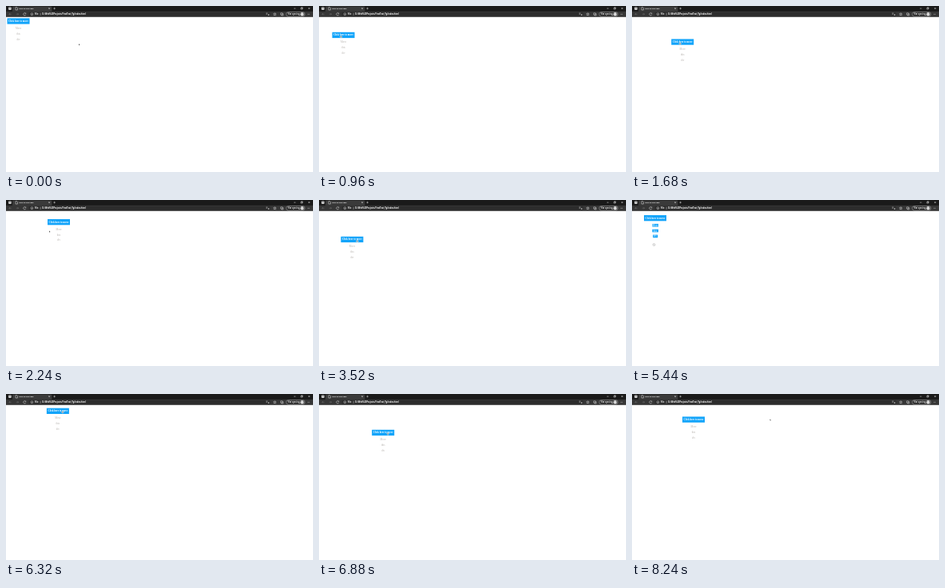
Recreate the animation shown at these times as an HTML page. Size 384 by 208 pixels, loop 8.32 s.

```html
<!DOCTYPE html>
<html lang="en">
<head>
<meta charset="utf-8">
<title>Drag demo</title>
<style>
html, body { margin: 0; width: 100%; height: 100%; overflow: hidden; background: #fff; }
svg { display: block; width: 100vw; height: 100vh; }
.ui { font-family: "Open Sans", sans-serif; font-weight: 700; font-size: 2.5px; fill: #fff; }
.page { font-family: "Liberation Serif", serif; font-size: 3.1px; text-anchor: middle; }
.line { fill: none; stroke: #ddd; stroke-width: .5; }
.dim { stroke: #777; }
</style>
</head>
<body>
<svg viewBox="0 0 384 208">
  <rect width="384" height="208" fill="#fff"/>

  <!-- title bar -->
  <rect width="384" height="7" fill="#1a1a1a"/>
  <path d="M8 7V2Q8 .6 9.4 .6H56Q57.4 .6 57.4 2V7Z" fill="#3a3a3a"/>
  <rect x="3.2" y="1.6" width="3.4" height="3.2" rx=".5" fill="#eee"/>
  <path d="M3.8 2.6H6" stroke="#111" stroke-width=".5"/>
  <path class="line" d="M12 1.6h1.6l.9 .9v2.5H12Z"/>
  <text class="ui" x="16.5" y="4.2" style="font-size:2.2px">Drill-Sh Tou Fash</text>
  <path class="line" d="M53.2 2.2l1.8 1.8m0-1.8l-1.8 1.8M59.3 3.1h2.6m-1.3-1.3v2.6"/>
  <path class="line" d="M360 3.1h2.4M368.8 2.4h1.7v1.7h-1.7ZM369.4 2.4v-.6h1.7v1.7h-.6M378.2 2l2 2m0-2l-2 2"/>

  <!-- toolbar -->
  <rect y="6.8" width="384" height="7" fill="#363636"/>
  <rect x="28.5" y="7.8" width="302" height="5" rx="1.2" fill="#2c2c2c"/>
  <path class="line dim" d="M6.6 10.2H3.8m1.1-1.1l-1.1 1.1l1.1 1.1M12.8 10.2h2.8m-1.1-1.1l1.1 1.1l-1.1 1.1"/>
  <path class="line" d="M24.6 9.3a1.6 1.6 0 1 0 .2 1.5M24.8 8.5v1.1h-1.1"/>
  <circle class="line" cx="32.4" cy="10.2" r="1.4"/>
  <path class="line" d="M32.4 10v.9M43.1 8.7v3"/>
  <text class="ui" x="36" y="11.2">File</text>
  <text class="ui" x="45.3" y="11.2">D:/Web%20Projects/FirstTest_Pg/index.html</text>
  <path class="line" d="M325.3 9h2m-2 1.2h1.6M328.5 10v2m-1-1h2"/>
  <path class="line" d="M336.2 8.6l.5 1.1l1.2 .1l-.9 .8l.3 1.2l-1.1-.6l-1.1 .6l.3-1.2l-.9-.8l1.2-.1Z"/>
  <path class="line" d="M343.6 8.8h2.2v2.2h-2.2ZM344.6 11v.9h2.2V9.7h-1"/>
  <rect x="350.5" y="7.6" width="23.3" height="5.3" rx="2.6" fill="#1b1b1b" stroke="#ccc" stroke-width=".5"/>
  <text class="ui" x="352.6" y="11.1">Not syncing</text>
  <circle cx="370.4" cy="10.3" r="2.2" fill="#d5d5d5"/>
  <path d="M377 10.3h.6m.6 0h.6m.6 0h.6" stroke="#ddd" stroke-width=".6"/>

  <g id="box">
    <rect width="28" height="7.3" fill="#12a4fa"/>
    <text class="page" x="14" y="4.7" fill="#fff" font-weight="bold">Click here to move</text>
    <g id="marks" fill="#12a4fa"></g>
    <g id="lines" class="page"></g>
  </g>

  <g id="cursor">
    <path id="arrow" d="M0 0V1.9L.5 1.5L.9 2.2L1.2 2L.8 1.3H1.5Z" fill="#444"/>
    <g id="cross" fill="none">
      <path d="M-1.6 0H1.6M0-1.6V1.6" stroke="#fff" stroke-width="1.1"/>
      <path d="M-1.5 0H1.5M0-1.5V1.5" stroke="#555" stroke-width=".4"/>
    </g>
    <path id="noDrop" class="line" stroke-width=".4" style="stroke:#aaa"
      d="M-1.5 0a1.5 1.5 0 1 0 3 0a1.5 1.5 0 1 0-3 0M-1-1l2 2"/>
  </g>
</svg>
<script>
const LOOP = 8320, STEP = 80;
const $ = id => document.getElementById(id);
const words = ["Move", "this", "div"];
const lineY = i => 12.7 + 6.85 * i;
const markW = s => 1.2 + 1.6 * s.length;

$("marks").innerHTML = words.map((s, i) =>
  `<rect x="${14.2 - markW(s) / 2}" y="${lineY(i) - 1.8}" width="${markW(s)}" height="3.6"/>`).join("");
$("lines").innerHTML = words.map((s, i) =>
  `<text x="14" y="${lineY(i) + 1}">${s}</text>`).join("");

const ease = u => u * u * (3 - 2 * u);
const progress = (t, from, to) => Math.min(1, Math.max(0, (t - from) / (to - from)));

// Each move glides to a place; sag bends its path downwards.
const glide = (p, t, from, to, x, y, sag = 0) => {
  const u = progress(t, from, to), e = ease(u);
  p.x += (x - p.x) * e;
  p.y += (y - p.y) * e + 4 * sag * u * (1 - u);
};

function pose(t) {
  const box = { x: 1.5, y: 15.3 };
  const hand = { x: 89.5, y: 32 };  // relative to the box
  const drag = (...move) => glide(box, t, ...move);
  const point = (...move) => glide(hand, t, ...move);

  point(0, 400, 11, 5.8);
  drag(720, 1360, 49, 38, 11);
  drag(1600, 2080, 52, 24, 8);
  point(2160, 2240, 2, 14.5);
  point(2240, 2320, 20.5, 5.8);
  drag(2320, 2720, 78, 14, 28);
  drag(3200, 3520, 27.4, 45.8);
  drag(3760, 4400, 44, 35, 6);
  drag(4480, 4800, 15, 19);
  point(4880, 5440, 12.5, 37);
  point(5440, 5680, 20, 5);
  drag(5680, 6080, 34, 19, 20);
  drag(6080, 6480, 60, 17);
  drag(6560, 6880, 66.2, 44.8);
  point(6960, 7120, 12, 5);
  drag(7200, 7600, 63, 28.4);
  point(7920, 8240, 109.5, 3);
  return { box, hand };
}

const show = (id, on) => { $(id).style.display = on ? "" : "none"; };
const move = (id, x, y) => $(id).setAttribute("transform", `translate(${x} ${y})`);

function draw(now) {
  const t = Math.floor((now % LOOP) / STEP) * STEP;
  const { box, hand } = pose(t);
  const picked = t >= 5040 && t < 5600;
  const over = hand.x <= 28 && hand.y <= 7.3;
  move("box", box.x, box.y);
  move("cursor", box.x + hand.x, box.y + hand.y);
  show("marks", picked);
  show("noDrop", picked);
  show("cross", over && !picked);
  show("arrow", !over && !picked);
  $("lines").setAttribute("fill", picked ? "#fff" : "#b4b0ac");
}

const start = performance.now();
function tick() {
  draw(performance.now() - start);
  requestAnimationFrame(tick);
}
tick();
</script>
</body>
</html>
```
